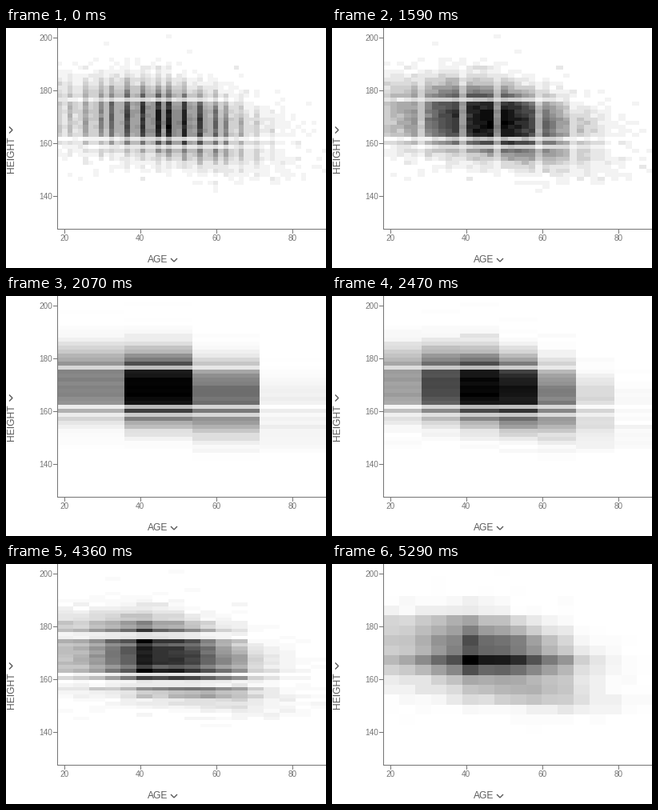
A matplotlib script for the animation above (6420 ms loop, 400 by 300 pixels).

```python
import numpy as np
import matplotlib.pyplot as plt
from matplotlib.animation import FuncAnimation

W, H, DPI = 400, 300, 100
LOOP, STEP = 6420, 30
TICK = 200 / 3  # the bin count follows the drag about 15 times a second
GREY, DARK = "#757575", "#5a5a5a"
AGE_MIN, AGE_MAX = 18, 89
CM_MIN, CM_MAX = 128, 203

# Drags of the bin count: start ms, end ms, first count, last count
AGE_DRAGS = [(0, 0, 52, 52), (1260, 1590, 55, 39), (1590, 2070, 39, 4),
             (2470, 2820, 7, 17)]
CM_DRAGS = [(0, 0, 50, 50), (4360, 5290, 54, 20)]


def age_x(age):
    return 64 + (age - AGE_MIN) * 4.75


def cm_y(cm):
    return 12.5 + (200 - cm) * 3.3


def bins_at(drags, t):
    start, end, first, last = [d for d in drags if d[0] <= t][-1]
    steps = max(1, round((end - start) / TICK))
    progress = min(1, int((t - start) / TICK) / steps)
    return round(first + (last - first) * progress)


def sample_people(total=5000, seed=4):
    """Ages, heights and the number of people for each pair of them."""
    rng = np.random.default_rng(seed)
    age, cm = np.meshgrid(np.arange(AGE_MIN, AGE_MAX + 1),
                          np.arange(CM_MIN, CM_MAX + 1), indexing="ij")
    by_age = np.exp(-((age - 48) / np.where(age < 48, 24, 18)) ** 2)

    # Older people are shorter; the hump has a flat top and faint wide tails
    offset = np.abs(cm - (171 - 8 * ((age - 18) / 50) ** 2))
    by_cm = np.exp(-(offset / 13) ** 3)
    tail = 0.015 * np.exp(-(offset / 16) ** 2)

    # Heights cluster on whole inches and on every third centimetre
    whole_inch = np.isin(cm, np.round(2.54 * np.arange(48, 84)))
    cluster = np.where(cm % 3 == 1, 1, np.where(whole_inch, 0.8, 0.15))

    share = by_age * (by_cm * cluster + tail)
    expected = total * share / share.sum()
    people = np.floor(expected + rng.random(expected.shape))
    return age.ravel(), cm.ravel(), people.ravel()


ages, heights, people = sample_people()

fig = plt.figure(figsize=(W / DPI, H / DPI), dpi=DPI, facecolor="white")
ax = fig.add_axes([0, 0, 1, 1])
ax.set_xlim(0, W)
ax.set_ylim(H, 0)
ax.axis("off")


def line(xs, ys, color=GREY, width=1.0):
    ax.plot(xs, ys, color=color, lw=width * 72 / DPI, snap=False,
            solid_capstyle="butt", solid_joinstyle="miter", zorder=3)


def label(x, y, text, size, color, ha="center", va="center_baseline", rotation=0):
    ax.text(x, y, text, fontsize=size * 72 / DPI, color=color, ha=ha, va=va,
            rotation=rotation, family="Liberation Sans", zorder=3)


line([64.5, 64.5], [0, 252])
line([64, W], [251.5, 251.5])
for cm in range(140, 201, 20):
    line([59, 64], [cm_y(cm)] * 2)
    label(58, cm_y(cm) - 1, str(cm), 10, GREY, ha="right")
for age in range(20, 81, 20):
    line([age_x(age)] * 2, [252, 257])
    label(age_x(age) - 0.7, 262.2, str(age), 10, GREY)
label(190, 288.5, "AGE", 12, DARK)
label(7, 158, "HEIGHT", 12, DARK, va="center", rotation=90)
line([206, 210, 214], [288, 292, 288], DARK, 1.4)
line([4, 8, 4], [131.5, 127.5, 123.5], DARK, 1.4)

state = {"bins": None, "mesh": None}


def draw(frame):
    t = frame * STEP + STEP / 2
    bins = bins_at(AGE_DRAGS, t), bins_at(CM_DRAGS, t)
    if bins != state["bins"]:
        if state["mesh"] is not None:
            state["mesh"].remove()
        age_edges = np.linspace(AGE_MIN, AGE_MAX, bins[0] + 1)
        cm_edges = np.linspace(CM_MIN, CM_MAX, bins[1] + 1)
        counts, _, _ = np.histogram2d(ages, heights, [age_edges, cm_edges],
                                      weights=people)
        state["mesh"] = ax.pcolormesh(
            age_x(age_edges), cm_y(cm_edges), counts.T / counts.max(),
            cmap="binary", vmin=0, vmax=1, antialiased=False, zorder=1)
        ax.set_xlim(0, W)
        ax.set_ylim(H, 0)
        state["bins"] = bins
    return [state["mesh"]]


anim = FuncAnimation(fig, draw, frames=LOOP // STEP, interval=STEP,
                     init_func=lambda: draw(0), repeat=True, repeat_delay=0)
plt.show()
```
